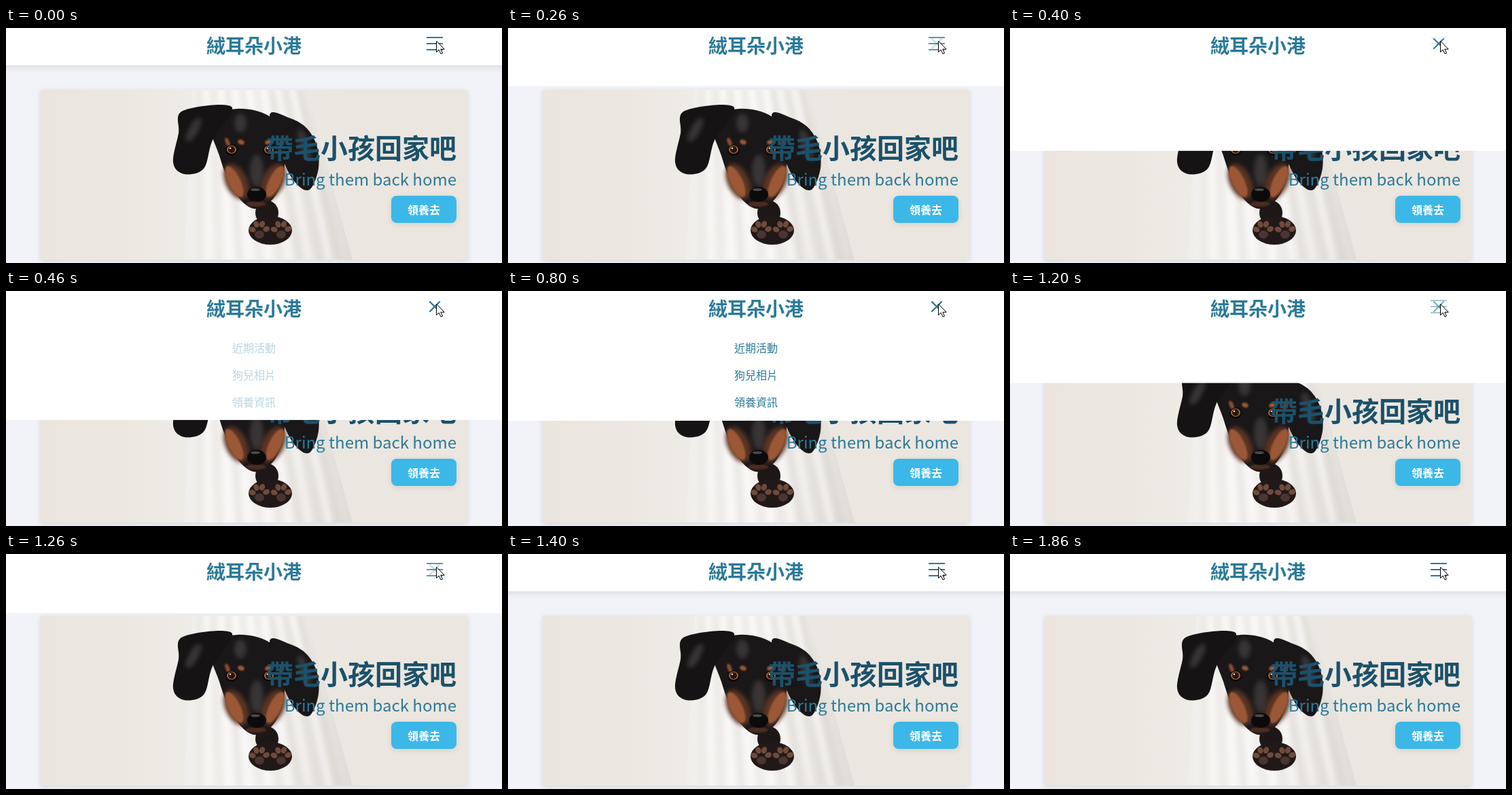
Recreate the animation shown at these times as an HTML page with a canvas. Size 730 px wide and 346 px high, loop 2 s.

```html
<!DOCTYPE html>
<html lang="zh-Hant">
<head>
<meta charset="utf-8">
<title>絨耳朵小港</title>
<style>
  html, body { margin: 0; width: 100%; height: 100%; overflow: hidden; background: #f2f3f9; }
  canvas { display: block; }
</style>
</head>
<body>
<canvas id="stage" width="730" height="346"></canvas>
<script>
const W = 730, H = 346;
const ctx = document.getElementById('stage').getContext('2d');
const FONT = '"Noto Sans CJK TC", "Noto Sans CJK", "Noto Sans", sans-serif';
const TEAL = '#2b7a99';
const LOOP = 2000, BAR = 55, MENU = 136;
const LINKS = ['近期活動', '狗兒相片', '領養資訊'];
const photo = { x: 51, y: 91, w: 628, h: 250 };

const clamp = v => Math.min(1, Math.max(0, v));

// cubic-bezier(.25, .1, .25, 1)
function ease(x) {
  x = clamp(x);
  let lo = 0, hi = 1;
  for (let i = 0; i < 24; i++) {
    const u = (lo + hi) / 2;
    if (0.75 * u * (1 - u) + u ** 3 < x) lo = u; else hi = u;
  }
  return 0.3 * lo * (1 - lo) ** 2 + 3 * lo * lo * (1 - lo) + lo ** 3;
}

function seeded(seed) {
  return () => (seed = seed * 16807 % 2147483647) / 2147483647;
}

function text(str, x, y, size, weight, color, align = 'center') {
  ctx.font = `${weight} ${size}px ${FONT}`;
  ctx.textAlign = align;
  ctx.fillStyle = color;
  ctx.fillText(str, x, y);
}

function poly(color, ...p) {
  ctx.beginPath();
  for (let i = 0; i < p.length; i += 2) ctx.lineTo(p[i], p[i + 1]);
  ctx.closePath();
  ctx.fillStyle = color;
  ctx.fill();
}

// Smooth closed shape through the given points
function blob(color, ...p) {
  const n = p.length / 2;
  const at = i => [p[(i + n) % n * 2], p[(i + n) % n * 2 + 1]];
  ctx.beginPath();
  ctx.moveTo(...at(0));
  for (let i = 0; i < n; i++) {
    const [a, b, c, d] = [at(i - 1), at(i), at(i + 1), at(i + 2)];
    ctx.bezierCurveTo(
      b[0] + (c[0] - a[0]) / 6, b[1] + (c[1] - a[1]) / 6,
      c[0] - (d[0] - b[0]) / 6, c[1] - (d[1] - b[1]) / 6, c[0], c[1]);
  }
  ctx.fillStyle = color;
  ctx.fill();
}

function oval(color, x, y, rx, ry, turn = 0) {
  ctx.beginPath();
  ctx.ellipse(x, y, rx, ry, turn, 0, 7);
  ctx.fillStyle = color;
  ctx.fill();
}

// The same oval on both sides of the face
function pair(color, dx, y, rx, ry, turn = 0) {
  for (const side of [-1, 1]) oval(color, 366 + side * dx, y, rx, ry, side * turn);
}

function line(color, width, x1, y1, x2, y2) {
  ctx.beginPath();
  ctx.moveTo(x1, y1);
  ctx.lineTo(x2, y2);
  ctx.strokeStyle = color;
  ctx.lineWidth = width;
  ctx.stroke();
}

function ramp(x1, x2, ...stops) {
  const g = ctx.createLinearGradient(x1, 0, x2, 0);
  stops.forEach((c, i) => g.addColorStop(i / (stops.length - 1), c));
  return g;
}

function shadow(color, blur, dy) {
  ctx.shadowColor = color;
  ctx.shadowBlur = blur;
  ctx.shadowOffsetY = dy;
}

function soft(px, paint) {
  ctx.filter = `blur(${px}px)`;
  paint();
  ctx.filter = 'none';
}

function cloth() {
  const rnd = seeded(11), folds = 16;
  poly(ramp(262, 510, '#f0eeea', '#f6f4f2', '#f4f2f0', '#eae7e3', '#dfdbd6'),
    274, 91, 443, 91, 470, 195, 510, 341, 262, 341);
  soft(3, () => {
    for (let i = 1; i < folds; i++) {
      const u = i / folds;
      const color = i % 2 ? `rgba(196,190,184,${0.15 + 0.2 * rnd()})` : 'rgba(255,255,255,.5)';
      line(color, 4 + 5 * rnd(), 274 + 169 * u, 91, 270 + 235 * u, 341);
    }
  });
}

function dog() {
  const black = '#191718', ink = '#0c0b0c', tan = '#9c5836', grey = '#393536';

  oval('#1d1817', 384, 272, 17, 18);
  soft(0.6, () => {
    blob(black, 300, 136, 340, 119, 386, 129, 408, 160, 409, 212,
      395, 249, 370, 266, 348, 256, 328, 226, 314, 188);
    blob('#151314', 260, 122, 332, 116, 304, 165, 291, 207, 262, 215, 246, 198, 254, 155);
    blob(black, 388, 129, 416, 132, 441, 146, 457, 172, 460, 206, 448, 237, 430, 232, 410, 200);
  });

  soft(3, () => {
    oval(grey, 276, 150, 7, 20, 0.5);
    oval(grey, 439, 172, 7, 24, -0.3);
    oval(grey, 345, 140, 9, 14);
    oval(grey, 369, 210, 10, 24);
    pair('#5c3524', 27, 226, 16, 28, 0.45);
  });
  soft(1.2, () => {
    pair(tan, 30, 226, 9, 25, 0.45);
    pair(tan, 20, 168, 5, 3.5, -0.3);
    pair('#8b4e30', 40, 168, 3, 7, 0.4);
    oval('#4e2d20', 368, 259, 15, 4);
  });

  for (const x of [332, 387]) {
    oval(ink, x, 180, 9, 8);
    oval('#a9683f', x, 179, 7, 6);
    oval('#2a150e', x, 179, 5, 5);
    oval('#e6d3c3', x - 2, 177, 1.3, 1.3);
  }
  oval(ink, 369, 245, 14, 11);
  oval('#4b494b', 367, 238, 7, 2);

  // Two paws, each a pad with a fan of toes
  oval('#211917', 389, 298, 32, 21);
  for (const x of [373, 405]) {
    for (let a = -2.8; a < 0; a += 0.8) {
      oval('#6f4b3b', x + 11 * Math.cos(a), 301 + 13 * Math.sin(a), 4, 5, a + 1.6);
    }
    oval('#4a3533', x, 304, 7, 6);
  }
}

function banner() {
  const { x, y, w, h } = photo;
  ctx.save();
  shadow('rgba(0,0,0,.12)', 8, 2);
  ctx.fillStyle = '#ebe6df';
  ctx.fillRect(x, y, w, h);
  ctx.restore();

  ctx.save();
  ctx.beginPath();
  ctx.rect(x, y, w, h);
  ctx.clip();
  ctx.fillStyle = ramp(x, x + w, '#ebe5de', '#ece8e1', '#efede8', '#ebe8e2', '#ebe6df', '#ebe6df');
  ctx.fillRect(x, y, w, h);
  cloth();
  dog();
  ctx.restore();

  text('帶毛小孩回家吧', 663, 192, 40, 700, '#1b516b', 'right');
  text('Bring them back home', 663, 232, 24, 400, TEAL, 'right');

  ctx.save();
  shadow('rgba(0,0,0,.1)', 8, 2);
  ctx.beginPath();
  ctx.roundRect(567, 247, 96, 40, 8);
  ctx.fillStyle = '#3bb8e8';
  ctx.fill();
  ctx.restore();
  text('領養去', 615, 274, 16, 700, '#fff');
}

function menuIcon(open) {
  const x = 631, y = 23;
  ctx.lineCap = 'round';
  ctx.globalAlpha = 1 - open;
  for (const row of [-1, 0, 1]) line(TEAL, 2.2, x - 11.2, y + row * 9, x + 11.2, y + row * 9);
  ctx.globalAlpha = open;
  for (const d of [-7, 7]) line(TEAL, 2.4, x - 7, y - d, x + 7, y + d);
  ctx.globalAlpha = 1;
}

function header(open, links) {
  ctx.save();
  shadow('rgba(0,0,0,.12)', 10, 2);
  ctx.fillStyle = '#fff';
  ctx.fillRect(-20, -20, W + 40, BAR + 20);
  ctx.restore();

  if (open > 0.01) {
    ctx.fillStyle = '#fff';
    ctx.fillRect(0, BAR - 1, W, MENU * open + 1);
  }
  text('絨耳朵小港', W / 2, 37, 28, 700, TEAL);

  ctx.globalAlpha = links;
  LINKS.forEach((s, i) => text(s, W / 2, 90 + i * 40, 16, 500, TEAL));
  menuIcon(open);
}

function cursor() {
  ctx.save();
  ctx.translate(633.5, 19.5);
  poly('#fff', 0, 0, 0, 16, 3.7, 12.5, 6.5, 18.5, 9, 17.5, 6.3, 11.7, 11.3, 11.7);
  ctx.strokeStyle = '#000';
  ctx.lineWidth = 1;
  ctx.stroke();
  ctx.restore();
}

function draw(t) {
  const open = t < 1100 ? ease((t - 213) / 280) : 1 - ease((t - 1130) / 280);
  const links = t < 1100 ? ease((t - 410) / 240) : 0;
  ctx.fillStyle = '#f2f3f9';
  ctx.fillRect(0, 0, W, H);
  banner();
  header(open, links);
  cursor();
}

// The picture is held at 0 and 60 ms of every 200 ms
function hold(t) {
  const beat = t % 200;
  return t - beat + (beat >= 60 ? 60 : 0);
}

const start = performance.now();
function tick() {
  draw(hold((performance.now() - start) % LOOP));
  requestAnimationFrame(tick);
}
tick();
</script>
</body>
</html>
```
